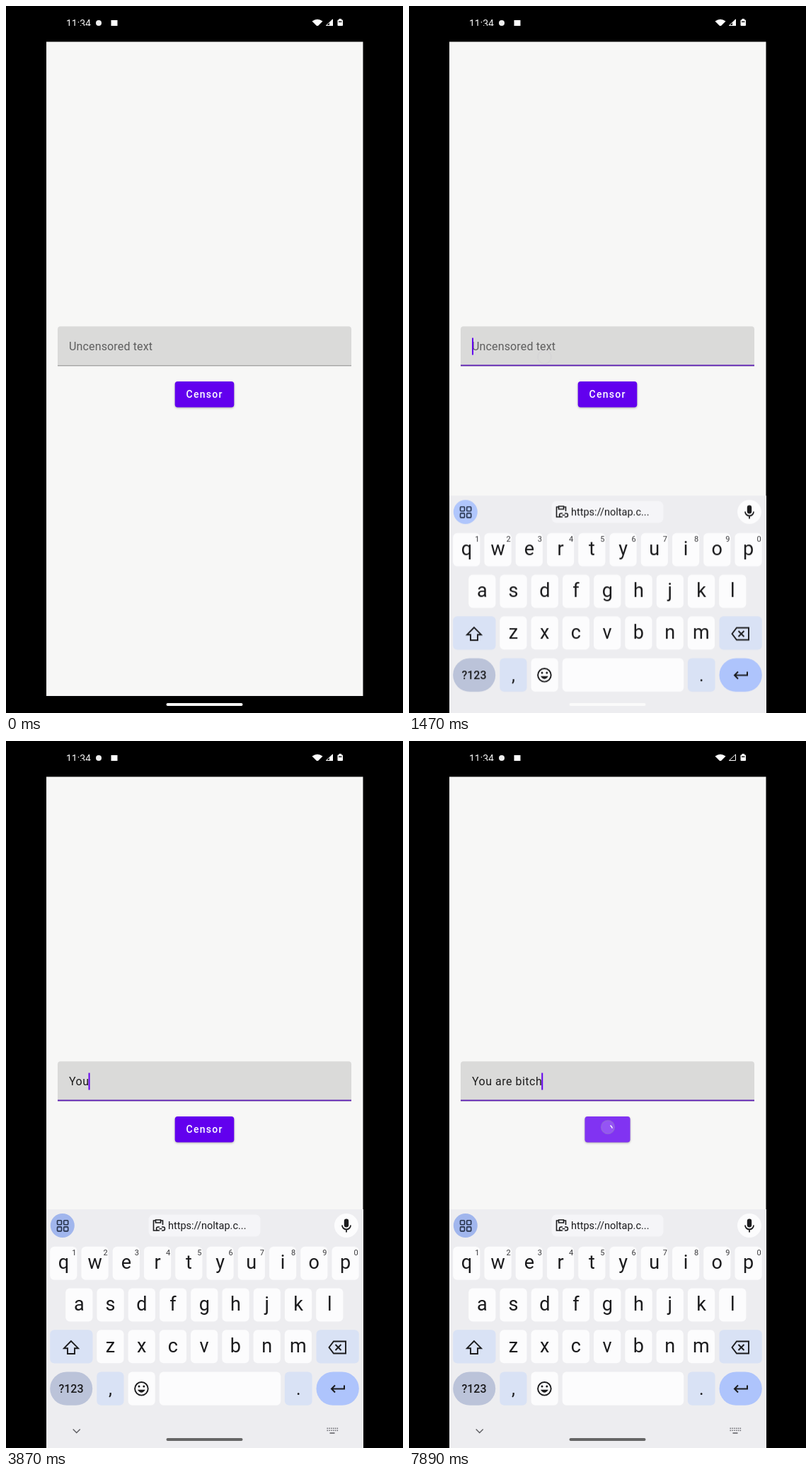
Write an HTML page with a canvas that moves like this. It is 561 px wide and 998 px high and loops after 7990 ms.

```html
<!DOCTYPE html>
<html lang="en">
<head>
<meta charset="utf-8">
<title>Text censor demo</title>
<style>
html, body { margin: 0; width: 100%; height: 100%; overflow: hidden; background: #000; }
canvas { display: block; width: 100vw; height: 100vh; }
</style>
</head>
<body>
<canvas id="stage" width="561" height="998"></canvas>
<script>
const stage = document.getElementById('stage').getContext('2d');
const layer = new OffscreenCanvas(561, 998).getContext('2d');
let ctx = stage;

const LOOP = 7990;
const PURPLE = '#6200ee', KEY = '#fcfcfd', KEY_BLUE = '#d9e2f5', INK = '#1b1b1d';
const TYPED = 'You are bitch';
const TYPE_TIMES = [3430, 3570, 3870, 4340, 4460, 4680, 4780, 4830, 5150, 5370, 5520, 5820, 5940];
const CARET_OFF = [[2200, 2700], [3200, 3430], [6560, 7080]];
const FOCUS = 1110, SLIDE = 1253, SHIFT_ON = 3150, PRESS = 7280, LOADING = 7730;

const clamp = v => Math.max(0, Math.min(1, v));
const ramp = (t, from, length) => clamp((t - from) / length);

function box(x, y, w, h, radius, color) {
  ctx.beginPath();
  ctx.roundRect(x, y, w, h, radius);
  ctx.fillStyle = color;
  ctx.fill();
}

function disc(x, y, r, color) {
  ctx.beginPath();
  ctx.arc(x, y, r, 0, 2 * Math.PI);
  ctx.fillStyle = color;
  ctx.fill();
}

function text(str, x, y, font, color, align = 'left', spacing = 0) {
  ctx.font = font + ' Roboto, sans-serif';
  ctx.letterSpacing = spacing + 'px';
  ctx.textAlign = align;
  ctx.fillStyle = color;
  ctx.fillText(str, x, y);
}

// Draws an SVG path around (x, y); fills it when width is 0.
function icon(d, x, y, color = INK, width = 2) {
  ctx.save();
  ctx.translate(x, y);
  const path = new Path2D(d);
  if (width) {
    ctx.strokeStyle = color;
    ctx.lineWidth = width;
    ctx.stroke(path);
  } else {
    ctx.fillStyle = color;
    ctx.fill(path);
  }
  ctx.restore();
}

function statusBar(t) {
  ctx.save();
  ctx.beginPath();
  ctx.rect(57, 0, 448, 28);
  ctx.clip();
  text('11:34', 85, 29.5, '14px', '#f2f2f2');
  disc(131, 24, 4, '#eee');
  box(148.5, 20, 9, 8, 0, '#fff');
  icon('M-7.5 -2Q0 -7.5 7.5 -2L1.5 4Q0 5.5 -1.5 4Z', 440, 23.5, '#fff', 0);
  icon('M-4.5 4L4.5 4L4.5 -4.5Z', 457, 23.5, '#fff', 1);
  if (t < 7600) icon('M0 4.5V0L5 -5V4.5Z', 457, 23.5, '#fff', 0);
  box(468.5, 19.5, 7.5, 8.5, 1, '#fff');
  box(470.5, 18, 3.5, 2, 0, '#fff');
  box(470, 21.5, 4.5, 1.5, 0, '#222');
  ctx.restore();
}

function textField(t) {
  const focus = ramp(t, FOCUS, 150);
  const typed = TYPED.slice(0, TYPE_TIMES.filter(time => time <= t).length);
  box(73, 452.3, 415, 56, [4, 4, 0, 0], '#dadad9');
  box(73, 507.3, 415, 1, 0, '#919191');
  if (focus) {
    ctx.globalAlpha = focus;
    box(73, 506.5, 415, 1.8, 0, '#5c1cb4');
    ctx.globalAlpha = 1;
  }
  if (typed) text(typed, 89, 486, '16px', '#1c1c1c', 'left', 0.5);
  else text('Uncensored text', 89, 486, '16px', '#5e5e5e', 'left', 0.15);

  const visible = t >= FOCUS && !CARET_OFF.some(([from, to]) => t >= from && t < to);
  if (visible) {
    const width = typed ? ctx.measureText(typed).width - 1 : 0;
    box(89 + width, 468.5, 2, 24, 0, PURPLE);
  }
}

function button(t) {
  const loading = t >= LOADING;
  const pressed = ramp(t, PRESS + 60, 150);
  const lift = pressed * (1 - ramp(t, LOADING, 150));
  const width = loading ? 64 : 83.6, x = 280.5 - width / 2;
  ctx.save();
  ctx.shadowColor = 'rgba(0,0,0,.3)';
  ctx.shadowBlur = 3 + 6 * lift;
  ctx.shadowOffsetY = 1.2 + 2 * lift;
  box(x, 530, width, 36.4, 4, PURPLE);
  ctx.restore();

  if (pressed) {
    ctx.save();
    ctx.beginPath();
    ctx.roundRect(x, 530, width, 36.4, 4);
    ctx.clip();
    const grow = 1 - (1 - ramp(t, PRESS + 60, 225)) ** 2;
    disc(281, 546, 14 + 36 * grow, `rgba(255,255,255,${0.2 * pressed})`);
    ctx.restore();
  }

  if (!loading) {
    text('Censor', 254.6, 553.4, '500 14px', '#fff', 'left', 1.25);
    return;
  }
  const age = t - LOADING, sweep = ramp(age, 0, 666);
  const start = -Math.PI / 2 + age / 1332 * 5;
  ctx.beginPath();
  ctx.arc(280.5, 548.3, 7, start, start + 5 * sweep * sweep * (3 - 2 * sweep));
  ctx.strokeStyle = '#fff';
  ctx.lineWidth = 1.5;
  ctx.stroke();
}

function touch(t, x, y, down, up) {
  if (t < down || t > up + 420) return;
  ctx.save();
  ctx.globalAlpha = ramp(t, down - 30, 60) * (1 - ramp(t, up, 420));
  disc(x, y, 9.5, 'rgba(255,255,255,.3)');
  ctx.strokeStyle = 'rgba(150,135,190,.75)';
  ctx.lineWidth = 1.5;
  ctx.stroke();
  ctx.restore();
}

function keyRow(letters, x, y, upper) {
  [...letters].forEach((letter, i) => {
    const left = x + i * 44.25;
    box(left, y, 38.2, 47, 6, KEY);
    text(upper ? letter.toUpperCase() : letter, left + 19.1, y + 31.3, '27px', INK, 'center');
  });
}

function toolbar(t) {
  disc(79.8, 684, 17, t < 3300 ? '#b0c6fc' : '#a1b6ed');
  for (const x of [72.5, 81.7])
    for (const y of [676.7, 685.9])
      icon('M1 0H5A1 1 0 0 1 6 1V5A1 1 0 0 1 5 6H1A1 1 0 0 1 0 5V1A1 1 0 0 1 1 0Z', x, y, '#26324b', 1.6);

  disc(481, 684, 17, KEY);
  box(477.8, 674.5, 6.4, 12, 3.2, INK);
  icon('M-6 -1A6 6 0 0 0 6 -1M0 5V9', 481, 684.5, INK, 1.8);

  const scale = 0.35 + 0.65 * ramp(t, 1285, 150);
  ctx.save();
  ctx.globalAlpha = ramp(t, 1265, 110);
  ctx.translate(280.5, 684);
  ctx.scale(scale, scale);
  box(-79, -15.5, 158, 31, 7, '#f5f5f8');
  icon('M-1 7H-6.5V-7H-4M4 -7H6.5V-1M-3.5 -8H3.5V-4H-3.5Z', -65.5, 0, INK, 1.6);
  icon('M2 1H0A2.5 2.5 0 0 0 0 6H2M5 1H7A2.5 2.5 0 0 1 7 6H5M1.5 3.5H5.5', -65.5, 1, INK, 1.5);
  text('https://noltap.c...', -51.5, 5, '14.5px', INK);
  ctx.restore();
}

function keys(upper) {
  keyRow('qwertyuiop', 62.2, 713.7, upper);
  for (let i = 0; i < 10; i++)
    text((i + 1) % 10, 96.4 + i * 44.25, 726, '11px', '#38383b', 'center');
  keyRow('asdfghjkl', 84.2, 772.5, upper);
  keyRow('zxcvbnm', 128.3, 831.3, upper);

  box(62.2, 831.3, 60.3, 47.3, 6, KEY_BLUE);
  const arrow = 'M0 -9L-10 1.2H-5V9H5V1.2H10Z';
  icon(arrow, 92, 856, INK, 1.9);
  if (upper) icon(arrow, 92, 856, INK, 0);
  box(438.5, 831.3, 60.3, 47.3, 6, KEY_BLUE);
  icon('M-12 0L-5.5 -8.5H11.5V8.5H-5.5ZM-3 -4L5 4M5 -4L-3 4', 468.5, 856, INK, 1.9);

  box(62.2, 890.5, 60, 47.3, 23.6, '#bbc3d9');
  text('?123', 92, 920, '500 16px', INK, 'center');
  box(128.3, 890.5, 38.2, 47.3, 6, KEY_BLUE);
  text(',', 147.4, 923, '25px', INK, 'center');
  box(172.5, 890.5, 38.2, 47.3, 6, KEY);
  icon('M9.3 0A9.3 9.3 0 1 1 -9.3 0A9.3 9.3 0 1 1 9.3 0', 191.4, 914.3, INK, 1.9);
  icon('M-5.5 1.5Q0 9.5 5.5 1.5Z', 191.4, 914.3, INK, 0);
  disc(188, 911, 1.5, INK);
  disc(194.8, 911, 1.5, INK);
  box(216.7, 890.5, 171.5, 47.3, 6, KEY);
  box(393.9, 890.5, 38.7, 47.3, 6, KEY_BLUE);
  text('.', 413.2, 923, '25px', INK, 'center');
  box(438.5, 890.5, 60.3, 47.3, 23.6, '#aec4fc');
  icon('M9.5 -5V0H-8.5M-3.5 -5L-8.5 0L-3.5 5', 468.5, 914.5, INK, 2);

  icon('M-5 -2.5L0 2.5L5 -2.5', 99.7, 974, '#606064', 1.4);
  for (let i = 0; i < 6; i++)
    for (let row = 0; row < 2; row++)
      box(453.5 + i * 2.8, 969.5 + row * 3, 1.6, 1.6, 0, '#737378');
  box(457.5, 976, 7, 1.8, 0, '#737378');
}

// The keyboard is drawn opaque on its own layer, which then slides and fades in as a whole.
function keyboard(t) {
  if (t < SLIDE) return;
  ctx = layer;
  ctx.clearRect(0, 0, 561, 998);
  box(57, 661, 448, 337, 0, '#ededf0');
  toolbar(t);
  keys(t >= SHIFT_ON && t < TYPE_TIMES[0]);
  ctx = stage;

  const offset = t > 2030 ? 0 : 337 * Math.exp((SLIDE - t) / 90);
  ctx.globalAlpha = ramp(t, SLIDE, 155);
  ctx.drawImage(layer.canvas, 0, offset);
  box(57, 998 - 1 + offset, 448, 40, 0, '#ededf0');
  ctx.globalAlpha = 1;
}

function draw(t) {
  box(0, 0, 561, 998, 0, '#000');
  statusBar(t);
  box(57, 50.5, 447.5, 923.5, 0, '#f7f7f6');
  textField(t);
  button(t);
  keyboard(t);
  const shade = Math.round(250 - 148 * ramp(t, 1760, 230));
  box(226.5, 984, 108, 4, 2, `rgb(${shade},${shade},${shade})`);
  touch(t, 191.5, 495.5, 930, 1080);
  touch(t, 281, 545, PRESS, 7700);
}

let begin;
function tick(now) {
  begin ??= now;
  draw((now - begin) % LOOP);
  requestAnimationFrame(tick);
}
requestAnimationFrame(tick);
</script>
</body>
</html>
```
